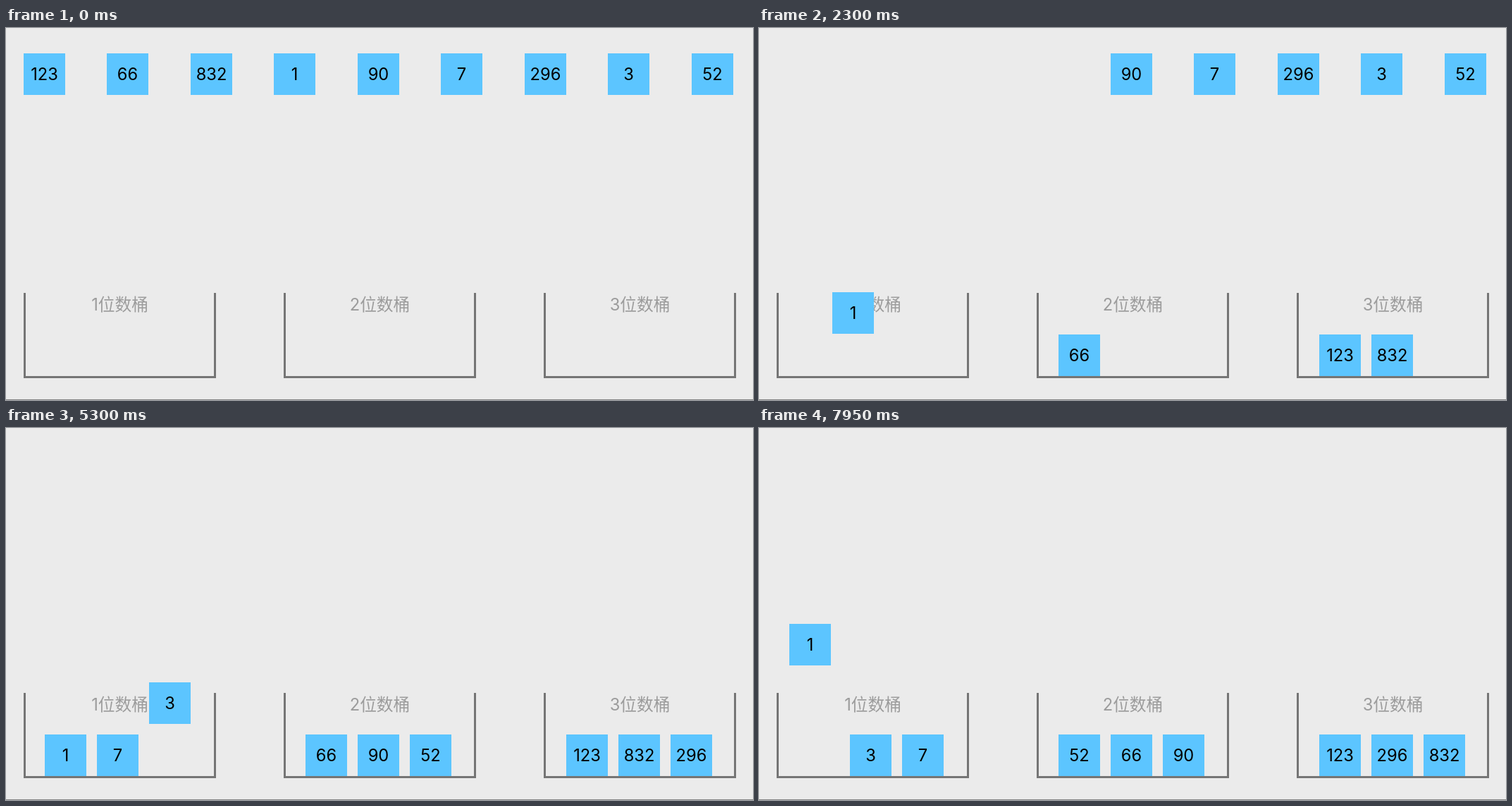
Animation, 1060 px wide and 528 px high, one loop 8000 ms. Source, as an HTML page:

```html
<!DOCTYPE html>
<html lang="zh">
<head>
<meta charset="utf-8">
<title>桶排序</title>
<style>
  html, body { margin: 0; width: 100%; height: 100%; overflow: hidden; background: #ebebeb; }
  #stage {
    position: relative; width: 1060px; height: 528px; overflow: hidden; box-sizing: border-box;
    border-bottom: 1px solid #858585;
    font: 23.7px Inter, "Noto Sans CJK SC", "Noto Sans CJK", sans-serif;
    text-align: center;
  }
  .bucket {
    position: absolute; top: 376px; width: 273px; height: 121px; box-sizing: border-box;
    border: 3px solid #757575; border-top: 0; color: #9c9c9c; line-height: 34px;
  }
  .box {
    position: absolute; left: 0; top: 0; width: 59px; height: 59px;
    background: #5cc5ff; color: #000; line-height: 60px;
  }
</style>
</head>
<body>
<div id="stage"></div>
<script>
const LOOP = 8000, TICK = 50;
const TOP = 36, FLOOR = 435, LIFT = 74;
const stage = document.getElementById('stage');

function add(className, text) {
  const el = document.createElement('div');
  el.className = className;
  el.textContent = text;
  stage.append(el);
  return el;
}

[25, 394, 763].forEach((x, i) => {
  add('bucket', `${i + 1}位数桶`).style.left = x + 'px';
});

const rowX = i => 25 + 118.45 * i;
const slotX = (bucket, slot) => 55 + 370 * bucket + 74 * slot;

// Each box keeps a list of moves {start, length, x, y}.
const boxes = {};
function move(value, start, length, x, y) {
  boxes[value].moves.push({ start, length, x, y });
}

// Distribute: every number goes to the bucket of its digit count.
const filled = [0, 0, 0];
[123, 66, 832, 1, 90, 7, 296, 3, 52].forEach((value, i) => {
  const bucket = String(value).length - 1;
  boxes[value] = { el: add('box', value), x: rowX(i), y: TOP, moves: [] };
  move(value, 410 + 508.3 * i, 500, slotX(bucket, filled[bucket]++), FLOOR);
});

// Sort a bucket: lift the last box, shift the larger ones, insert.
function insertLast(bucket, start, lifted, slot, shifted) {
  const step = 303, length = 300;
  move(lifted, start, length, slotX(bucket, 2), FLOOR - LIFT);
  shifted.forEach((value, i) => {
    move(value, start + step, length, slotX(bucket, slot + 1 + i), FLOOR);
  });
  move(lifted, start + 2 * step, length, slotX(bucket, slot), FLOOR);
}
insertLast(0, 4984, 3, 1, [7]);
insertLast(1, 5892, 52, 0, [66, 90]);
insertLast(2, 6800, 296, 1, [832]);

// Collect: the smallest number heads back to the row.
move(1, 7731, 500, rowX(0), TOP);

// cubic-bezier(.42, 0, .58, 1)
function easeInOut(u) {
  if (u <= 0) return 0;
  if (u >= 1) return 1;
  let low = 0, high = 1;
  for (let i = 0; i < 24; i++) {
    const s = (low + high) / 2, r = 1 - s;
    const x = 1.26 * r * r * s + 1.74 * r * s * s + s * s * s;
    if (x < u) low = s; else high = s;
  }
  return low * low * (3 - 2 * low);
}

function draw(time) {
  for (const box of Object.values(boxes)) {
    let { x, y } = box;
    for (const m of box.moves) {
      const p = easeInOut((time - m.start) / m.length);
      x += (m.x - x) * p;
      y += (m.y - y) * p;
    }
    box.el.style.transform = `translate(${Math.round(x)}px, ${Math.round(y)}px)`;
  }
}

const origin = performance.now();
function frame() {
  const time = (performance.now() - origin) % LOOP;
  draw(Math.floor(time / TICK) * TICK);
  requestAnimationFrame(frame);
}
frame();
</script>
</body>
</html>
```
